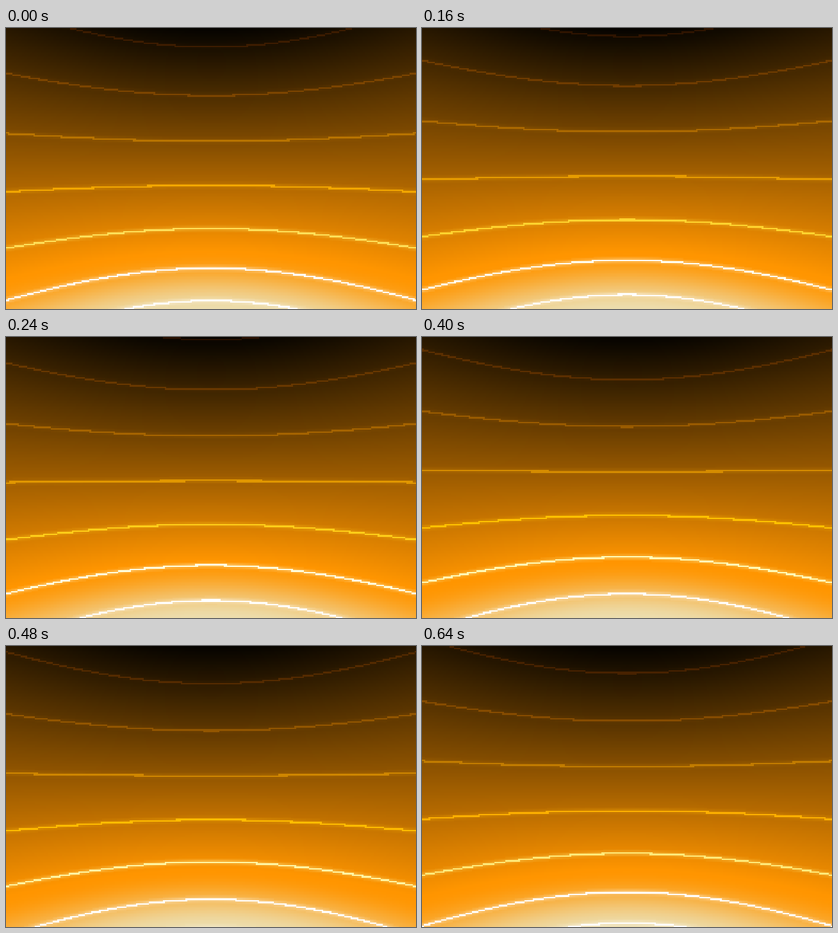
An HTML page with a canvas for the animation above (720 ms loop, 640 px wide and 440 px high).

```html
<!DOCTYPE html>
<html lang="en">
<head>
<meta charset="utf-8">
<title>Amber arcs</title>
<style>
html, body { margin: 0; width: 100%; height: 100%; overflow: hidden; background: #000; }
canvas { display: block; width: 640px; height: 440px; image-rendering: pixelated; }
</style>
</head>
<body>
<canvas id="stage" width="256" height="176"></canvas>
<script>
const W = 256, H = 176, CELL = 2.5;
const HORIZON = 216, FOCAL = 375;
const STEP = 80, LOOP = 720;
const SPEED = 0.1045; // line spacings per step

const ctx = document.getElementById('stage').getContext('2d');
const sky = ctx.createImageData(W, H);
const image = ctx.createImageData(W, H);

const clamp = (v, lo, hi) => Math.min(hi, Math.max(lo, v));
const mix = (a, b, t) => a.map((v, i) => v + (b[i] - v) * t);

// Height of line u on the centre column; spacing shrinks downwards
const heightAt = u => 246.5 + u * (68.7 - u * (1 + u * (0.28 + u * 0.115)));

// Level curves are hyperbolas that bend away from the horizon
const stretch = col => Math.hypot(1, ((col + 0.5) * CELL - W * CELL / 2) / FOCAL);

// Black to amber, then to cream near the bottom
function skyColour(level) {
  const red = 5 + 250 * Math.pow(clamp(level / 350, 0, 1), 1.05);
  const x = clamp((level - 350) / 95, 0, 1);
  return mix([red, red * 0.585, 0], [236, 222, 175], x * x * (3 - 2 * x));
}

// Each channel saturates in turn: brown, gold, yellow, white
function lineColour(level) {
  const red = 36 + 0.84 * level;
  const green = 14 + 0.45 * level + 0.0007 * level * level;
  const blue = 3.1 * (level - 285);
  return [red, green, blue].map(v => clamp(v, 0, 255));
}

function paintSky() {
  for (let x = 0; x < W; x++) {
    const s = stretch(x);
    for (let y = 0; y < H; y++) {
      const level = HORIZON + ((y + 0.5) * CELL - HORIZON) / s;
      sky.data.set([...skyColour(level), 255], (y * W + x) * 4);
    }
  }
}

function paintLine(level) {
  const colour = lineColour(level);
  const halo = 0.1 + 0.2 * clamp(level / 350, 0, 1);
  for (let x = 0; x < W; x++) {
    const centre = (HORIZON + (level - HORIZON) * stretch(x)) / CELL - 0.5;
    const mid = Math.round(centre);
    for (let y = Math.max(0, mid - 2); y <= Math.min(H - 1, mid + 2); y++) {
      const d = Math.abs(y - centre);
      const k = d < 0.53 ? 1 : halo * Math.exp(0.7 - d);
      const p = (y * W + x) * 4;
      for (let c = 0; c < 3; c++) image.data[p + c] += (colour[c] - image.data[p + c]) * k;
    }
  }
}

function paint(phase) {
  image.data.set(sky.data);
  for (let n = -3; n <= 4; n++) paintLine(heightAt(n - phase));
  ctx.putImageData(image, 0, 0);
}

let shown = -1;
function tick() {
  const step = Math.floor(performance.now() % LOOP / STEP);
  if (step !== shown) {
    shown = step;
    paint(step * SPEED);
  }
  requestAnimationFrame(tick);
}

paintSky();
tick();
</script>
</body>
</html>
```
